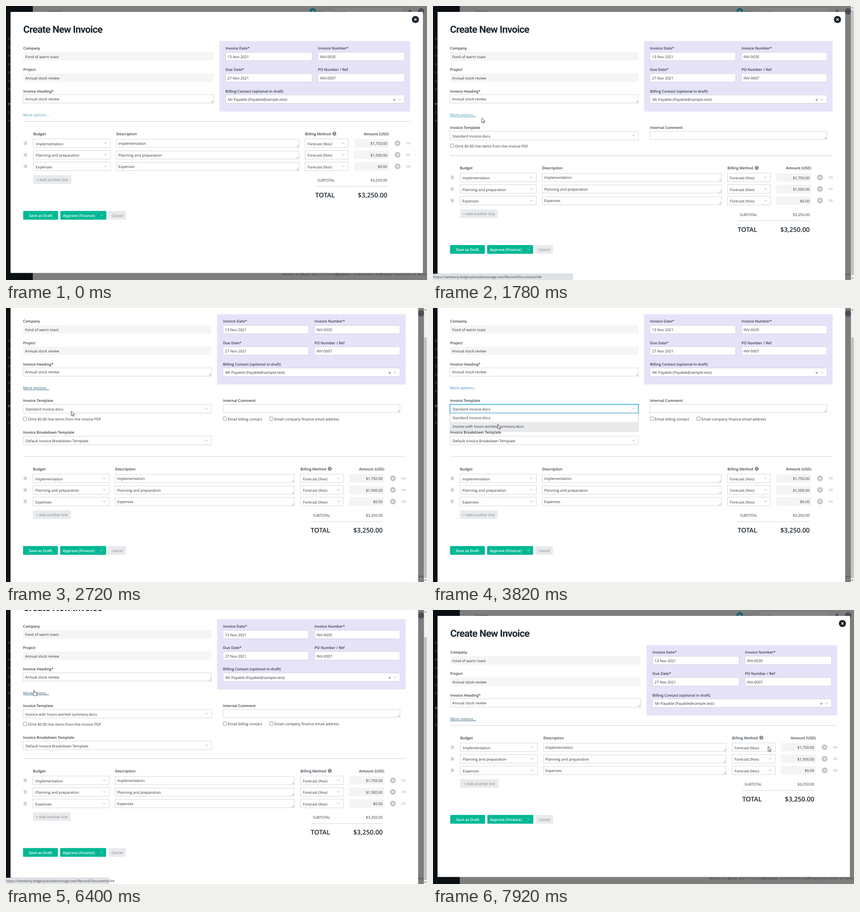
An HTML page that plays this animation: 927 by 604 pixels, repeating every 7990 ms.

```html
<!DOCTYPE html>
<html lang="en">
<head>
<meta charset="utf-8">
<title>Create New Invoice</title>
<style>
  html, body { margin: 0; width: 100%; height: 100%; overflow: hidden; background: #808080; }
  svg { display: block; width: 100%; height: 100%; }
  text { font: 400 8.15px "Open Sans", "Noto Sans", sans-serif; fill: #2b343c; text-rendering: geometricPrecision; white-space: pre; }
  .label { font-weight: 600; fill: #323c45; }
  .title { font: 700 21.6px Roboto, sans-serif; letter-spacing: -.75px; fill: #1d2830; }
  .total { font-size: 14.3px; font-weight: 600; fill: #1d2830; }
  .button { font-weight: 600; fill: #fff; }
  .muted { fill: #7b858d; }
  .dim { font-size: 7.6px; fill: #3f4142; }
  .side { font-size: 7.4px; fill: #656b70; }
  .url { font-size: 7.6px; fill: #40454a; }
</style>
</head>
<body>
<svg id="stage" viewBox="0 0 927 604" preserveAspectRatio="none"></svg>
<script>
const LOOP = 7990, FULL = 136.7, OVERFLOW = 73, MAX_SCROLL = 64;
const BORDER = '#c6cbd0', GREEN = '#00b894', PALE = '#e9eaec';
const COMPANY = 'Fond of warm toast', PROJECT = 'Annual stock review';
const CONTACT = 'Mr Payable (Payable@sample.test)';
const URL_TEXT = 'https://tamberly.ledgerplansdemostage.test/Record/Documents/4#';

const text = (x, y, s, cls = '', attrs = '') => `<text x="${x}" y="${y}" class="${cls}" ${attrs}>${s}</text>`;
const endText = (x, y, s, cls) => text(x, y, s, cls, 'text-anchor="end"');
const midText = (x, y, s, cls) => text(x, y, s, cls, 'text-anchor="middle"');
const box = (x1, y1, x2, y2, fill, attrs = '') =>
  `<rect x="${x1}" y="${y1}" width="${x2 - x1}" height="${y2 - y1}" fill="${fill}" ${attrs}/>`;
const path = (d, color, width = 0.8) => `<path d="${d}" fill="none" stroke="${color}" stroke-width="${width}"/>`;
const disc = (x, y, r, fill) => `<circle cx="${x}" cy="${y}" r="${r}" fill="${fill}"/>`;
const frame = (x1, y1, x2, y2) => box(x1, y1, x2, y2, '#fff', `stroke="${BORDER}" stroke-width=".8"`);
const chevron = (x, y, color = '#7d868d') => path(`M${x - 2.5} ${y - 1.2}l2.5 2.5l2.5 -2.5`, color);
const cross = (x, y, r, color, width) => path(`M${x - r} ${y - r}l${2 * r} ${2 * r}m0 ${-2 * r}l${-2 * r} ${2 * r}`, color, width);
const area = (x1, y1, x2, y2, s = '') => frame(x1, y1, x2, y2) + text(x1 + 4.5, y1 + 12.3, s) +
  path(`M${x2 - 5.5} ${y2 - 1}l4.5 -4.5M${x2 - 2.8} ${y2 - 1}l1.8 -1.8`, '#70777d', 0.7);
const select = (x1, y1, x2, s, cls = '') => frame(x1, y1, x2, y1 + 19) +
  text(x1 + 5.5, y1 + 13.8, s, cls) + chevron(x2 - 11, y1 + 9.3);
const check = (x, y, s) => box(x, y, x + 7.6, y + 7.6, '#fff', 'rx="1.2" stroke="#737373" stroke-width=".8"') +
  text(x + 10.3, y + 7.7, s);

function backdrop() {
  const side = ['RE', 'TI', 'FO', 'EX', 'LE', 'IN', 'RE'].map((s, i) => text(4.5, 75 + 18.5 * i, s, 'side')).join('') +
    text(4.5, 218.5, 'PR', 'side', 'style="fill:#c9cccf"') + text(4.5, 237, 'CO', 'side') + text(4.5, 255.5, 'PE', 'side');
  const footer = [[607, 'Version: 4.12'], [651, 'Build: 20211112.4 7e85'], [728, 'Updated: 14 November 2021'],
    [825, 'Privacy Policy'], [872, 'Terms of Service']].map(([x, s]) => text(x, 594, s, 'dim')).join('');
  return box(0, 0, 927, 604, '#7e7e7f') + box(0, 0, 59, 604, '#0a0f13') + side +
    text(84, 15, '← Projects', 'dim') + disc(675.5, 12, 7.5, '#1f6170') +
    path('M672.5 12h6M675.5 9v6', '#9aa', 0.9) + text(687, 15.5, 'New', 'dim') +
    box(719.5, 3, 872, 21, '#858586', 'stroke="#717273" stroke-width=".8"') + text(724, 15.5, 'Search', 'dim') +
    '<path d="M885.5 15c1.5 -1.5 1 -7 4 -7s2.5 5.5 4 7z" fill="#454a4f"/>' +
    disc(914, 12, 7.2, '#4b5157') + midText(914, 15, 'SU', 'dim') + footer;
}

function form(narrow) {
  const id = narrow ? 'n' : 'w';
  const m = x => narrow ? 37.5 + (x - 38) * 0.98885 : x;
  const l = x => narrow ? x - 0.5 : x;
  const r = x => narrow ? x - 10.2 : x;
  const label = (x, y, s) => text(x, y, s, 'label');
  const plain = (x, y, s) => box(m(x), y, m(457.5), y + 18.7, '#f5f5f5') + text(m(x) + 4.5, y + 13.2, s);
  const input = (x1, y, x2, s) => frame(m(x1), y, m(x2), y + 18.5) + text(m(x1) + 4.5, y + 13, s);

  const closeX = narrow ? 890.6 : 901.5;
  const top = text(l(38), 59.2, 'Create New Invoice', 'title') +
    disc(closeX, 29.8, 7.8, '#18222a') + cross(closeX, 29.8, 2.5, '#fff', 1.4) +
    label(l(38), 96.2, 'Company') + plain(38, 101.5, COMPANY) +
    label(l(38), 143.4, 'Project') + plain(38, 148.8, PROJECT) +
    label(l(38), 190.5, 'Invoice Heading*') + area(m(38), 195.7, m(457.5), 214, PROJECT) +
    box(m(470), 77.3, m(890), 232.5, '#e6e3f9') +
    label(m(483.3), 96.2, 'Invoice Date*') + input(483.3, 102, 674, '13 Nov 2021') +
    label(m(687), 96.2, 'Invoice Number*') + input(687, 102, 877.3, 'INV-0035') +
    label(m(483.3), 143.4, 'Due Date*') + input(483.3, 149, 674, '27 Nov 2021') +
    label(m(687), 143.4, 'PO Number / Ref') + input(687, 149, 877.3, 'INV-0007') +
    label(m(483.3), 190.5, 'Billing Contact (optional in draft)') + frame(m(483.3), 196, m(877.3), 214.5) +
    text(m(483.3) + 5.5, 209, CONTACT) + cross(r(855), 206.7, 1.8, '#343c43', 1) + chevron(r(866.7), 206) +
    text(l(38), 243, 'More options...', 'link');

  const more = label(l(38), 271, 'Invoice Template') + select(m(38), 276.2, m(457.5), '', 'template') +
    check(l(38.5), 304.2, 'Omit $0.00 line items from the invoice PDF') +
    label(m(483.3), 271, 'Internal Comment') + area(m(483.3), 276.2, m(877.3), 294) +
    `<g class="email">${check(m(483.5), 303.8, 'Email billing contact')}${check(m(587.3), 303.8, 'Email company finance email address')}</g>` +
    label(l(38), 341, 'Invoice Breakdown Template') + select(m(38), 346.2, m(457.5), 'Default Invoice Breakdown Template');

  const row = ([name, amount], i) => {
    const y = 302.5 + 25.5 * i;
    return box(l(38.5), y - 4.5, l(47.2), y + 4.5, PALE) + path(`M${l(41.5)} ${y - 2.6}l2.6 2.6l-2.6 2.6`, '#4d565d', 0.9) +
      select(m(60), y - 9.5, m(230), name) + area(m(243), y - 8.7, r(645.3), y + 9.3, name) +
      select(r(658.5), y - 9.5, r(753.5), 'Forecast (Nov)') +
      box(r(766.2), y - 9.2, r(843), y + 9.3, '#f4f4f4') + endText(r(839.3), y + 3.7, amount) +
      disc(r(862.2), y, 6.3, '#c3c6c8') + cross(r(862.2), y, 2, '#fff', 1.2) +
      path(`M${r(881.2)} ${y - 1.3}h9.3m0 2.7h-9.3`, '#b2b7bb', 1);
  };
  const lower = path(`M${l(38)} 254.5H${m(890)}`, '#d0d5d9', 1.2) +
    label(m(60), 284.8, 'Budget') + label(m(243), 284.8, 'Description') + label(r(658.5), 284.8, 'Billing Method') +
    disc(r(723), 281.5, 4.4, '#85898d') + path(`M${r(723)} 280.8v3M${r(723)} 278.7v1.1`, '#fff', 1.1) +
    endText(r(843), 284.8, 'Amount (USD)', 'label') +
    [['Implementation', '$1,750.00'], ['Planning and preparation', '$1,500.00'], ['Expenses', '$0.00']].map(row).join('') +
    box(m(60), 373, m(144), 392, PALE, 'rx="1"') + midText(m(102), 386, '+ Add another line', 'muted') +
    text(r(686), 387.4, 'SUBTOTAL', '', 'style="font-size:7.9px"') + endText(r(839.5), 387.4, '$3,250.00') +
    path(`M${r(681)} 397.8H${r(839.5)}`, '#c5cacd') +
    text(r(681), 422.3, 'TOTAL', 'total') + endText(r(839.7), 422.3, '$3,250.00', 'total') +
    box(l(38), 451.8, l(114.7), 471, GREEN, 'rx="1.5"') + midText(l(76.3), 465, 'Save as Draft', 'button') +
    box(l(119.7), 451.8, l(221), 471, GREEN, 'rx="1.5"') + text(l(125.6), 465, 'Approve (Finance)', 'button') +
    (narrow ? path('M200.5 451.8v19.2', '#00a384') : '') + chevron(l(210.8), 461.5, '#fff') +
    box(l(226), 451.8, l(264.5), 471, PALE, 'rx="1.5"') + midText(l(245.2), 465, 'Cancel', 'muted');

  const focus = box(37.5, 276.2, 452.3, 295.2, 'none', 'stroke="#8fd0f2" stroke-width="3.5" opacity=".45"') +
    box(37.5, 276.2, 452.3, 295.2, 'none', 'stroke="#2aa5e0" stroke-width="1.1"');
  const list = box(36.5, 296, 453.3, 337, '#000', 'opacity=".08" rx="1.5"') + frame(37.7, 295.7, 452, 334) +
    box(38.1, 296, 451.6, 315, PALE, 'id="pick"') +
    text(43, 308.7, 'Standard invoice.docx') + text(43, 327.7, 'Invoice with hours worked summary.docx');

  return `<clipPath id="${id}clip"><rect x="0" y="254" width="927" height="0"/></clipPath>
    <g id="${id}"><g class="page">${box(10, 13, narrow ? 907.5 : 918, narrow ? 760 : 588.5, '#fff')}${top}
    <g class="more" clip-path="url(#${id}clip)">${more}</g><g class="lower">${lower}</g>
    ${narrow ? `<g id="focus">${focus}</g><g id="list">${list}</g>` : ''}</g></g>`;
}

const scrollbar = box(920.3, 0, 927, 604, '#f1f1f1') + box(921, 9, 926.4, 500, '#c1c1c1', 'id="thumb"') +
  '<path d="M921.8 5l2 -2.5l2 2.5zM921.8 599l2 2.5l2 -2.5z" fill="#505050"/>';
const arrow = '<path id="arrow" d="M0 0V10.3L2.4 8.2L4 11.8L5.7 11L4.1 7.6H7.3Z" fill="#fff" stroke="#111" stroke-width=".75"/>';
const hand = '<path id="hand" d="M-1 .8Q0 -.6 1 .8V4.5Q2 3.6 2.9 4.7Q4 4 4.7 5.2Q6 4.8 6.2 6.2V9L5 12H-.8L-4 7.5Q-3.7 6 -2.3 6.9L-1 8Z" fill="#fff" stroke="#111" stroke-width=".75"/>';

const stage = document.getElementById('stage');
stage.innerHTML = backdrop() + form(false) + form(true) + `<g id="bar">${scrollbar}</g>
  <g id="status">${box(-1, 590.5, 227, 605, '#dee1e6', 'id="bubble" rx="2" stroke="#c3c6ca" stroke-width=".7"')}
  ${text(0, 600, URL_TEXT, 'url')}</g><g id="cursor">${arrow}${hand}</g>`;

const $ = id => document.getElementById(id);
const set = (el, name, value) => el.setAttribute(name, value);
const show = (id, on) => { $(id).style.display = on ? '' : 'none'; };
const clamp = v => Math.max(0, Math.min(1, v));
const part = (t, a, b) => clamp((t - a) / (b - a));
const swing = p => 0.5 - Math.cos(p * Math.PI) / 2;

// Pointer stops: time, x, y
const stops = [[260, 815, 597], [1020, 74, 239], [1560, 76, 240], [1780, 107.5, 246.7], [1990, 126, 264], [2120, 131.7, 270.3],
  [2720, 143.7, 227], [3470, 143.7, 227], [3820, 143, 256], [5220, 143, 256], [5290, 143, 254],
  [6050, 61.8, 177], [6670, 61.8, 177], [6930, 103, 333], [7500, 764, 293], [7780, 688, 311], [7920, 737.8, 301.2]];

function pointer(t) {
  const i = stops.findIndex(s => s[0] > t);
  if (i < 0) return stops[stops.length - 1].slice(1);
  if (i === 0) return stops[0].slice(1);
  const [t0, x0, y0] = stops[i - 1], [t1, x1, y1] = stops[i];
  const p = swing((t - t0) / (t1 - t0));
  return [x0 + (x1 - x0) * p, y0 + (y1 - y0) * p];
}

function linkStyle(t) {
  if (t < 950) return ['#4599b0', 'none'];
  if (t < 1990) return ['#3695ab', 'underline'];
  if (t < 2940) return ['#28596f', 'underline'];
  if (t < 5980) return ['#2f7dc4', 'none'];
  return ['#28596f', 'underline'];
}

function draw(t) {
  const open = FULL * (swing(part(t, 1568, 1968)) - swing(part(t, 6345, 6745)));
  const narrow = open > OVERFLOW;
  const limit = Math.max(0, open - OVERFLOW);
  const scroll = Math.min(limit, MAX_SCROLL * swing(part(t, 2055, 2455)));
  const g = $(narrow ? 'n' : 'w');
  show('n', narrow);
  show('w', !narrow);
  show('bar', narrow);

  set(g.querySelector('.page'), 'transform', `translate(0 ${-scroll})`);
  set(g.querySelector('.lower'), 'transform', `translate(0 ${open})`);
  set($(narrow ? 'nclip' : 'wclip').firstElementChild, 'height', open);
  g.querySelector('.email').style.display = open > 80 ? '' : 'none';
  g.querySelector('.template').textContent = t < 4350 ? 'Standard invoice.docx' : 'Invoice with hours worked summary.docx';
  const link = g.querySelector('.link');
  [link.style.fill, link.style.textDecoration] = linkStyle(t);

  const ratio = 586 / (604 + limit);
  set($('thumb'), 'y', 9 + scroll * ratio);
  set($('thumb'), 'height', 604 * ratio);

  const [x, y] = pointer(t);
  show('focus', t >= 2940 && t < 6180);
  show('list', t >= 3070 && t < 4350);
  set($('pick'), 'y', y > 251 ? 315 : 296);

  const first = t >= 1240 && t < 2190;
  show('status', first || (t >= 6180 && t < 6930));
  set($('status'), 'opacity', first ? 1 - part(t, 2050, 2190) * 0.7 : 1 - part(t, 6800, 6930));
  set($('bubble'), 'width', first && t > 1600 ? 308.5 : 228);

  const onLink = (t > 950 && t < 1620) || (t > 5980 && t < 6420);
  show('cursor', t >= 260);
  show('arrow', !onLink);
  show('hand', onLink);
  set($('cursor'), 'transform', `translate(${x} ${y})`);
}

const start = performance.now();
function tick() {
  draw((performance.now() - start) % LOOP);
  requestAnimationFrame(tick);
}
tick();
</script>
</body>
</html>
```
